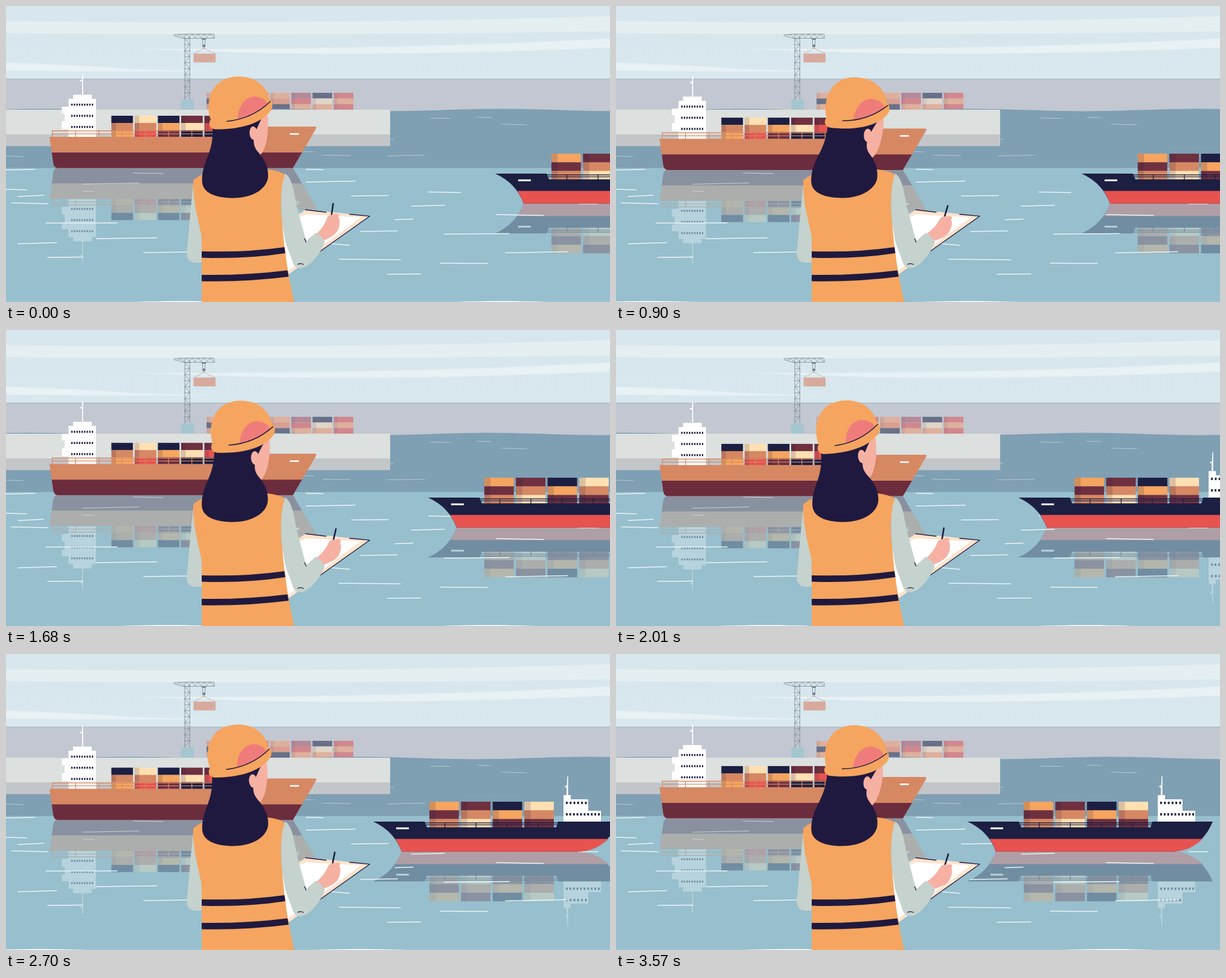
An HTML page with a canvas for the animation above (3600 ms loop, 1000 by 491 pixels).

```html
<!DOCTYPE html>
<html lang="en">
<head>
<meta charset="utf-8">
<title>Harbour</title>
<style>
  html, body { margin: 0; width: 100%; height: 100%; overflow: hidden; background: #fff; }
  canvas { display: block; width: 1000px; height: 491px; }
</style>
</head>
<body>
<canvas id="stage" width="1000" height="491"></canvas>
<script>
const ctx = document.getElementById('stage').getContext('2d');
const LOOP = 3600;
const C = {
  navy: '#1c1f42', hair: '#20193f', maroon: '#6f3040', keel: '#6b2c3d', red: '#e85350',
  rust: '#d68863', orange: '#f5a55f', cream: '#ffe0b3', white: '#ffffff',
  sea: '#97bfcd', deep: '#7f9fb3', skin: '#f6b1a3', sleeve: '#c6d2ce'
};

const rgb = hex => [1, 3, 5].map(i => parseInt(hex.slice(i, i + 2), 16));
const seaRgb = rgb(C.sea);
const solid = c => c;
const reflected = c => `rgb(${rgb(c).map((v, i) => Math.round(seaRgb[i] + (v - seaRgb[i]) * 0.31))})`;

const smooth = s => s * s * (3 - 2 * s);
// Eased value through [time, value] keys.
function track(keys, t) {
  for (let i = 1; i < keys.length; i++) {
    const [t0, a] = keys[i - 1], [t1, b] = keys[i];
    if (t <= t1) return a + (b - a) * smooth((t - t0) / (t1 - t0));
  }
  return keys[keys.length - 1][1];
}

const motion = {
  sail: [[0, 228], [3420, 0]],
  bob: [[0, 0], [1260, 4], [2400, 8], [3150, 3.9]],
  head: [[0, 0], [1140, 0.115], [2280, -0.06], [3420, 0.092]],
  hand: [[0, 0], [1140, 0.155], [2280, 0], [3420, 0.155]],
  swell: [[0, 0], [800, -235], [1150, -235], [1800, 0]]
};
const neck = { x: 378, y: 282 };

function rect(x0, y0, x1, y1, color) {
  ctx.fillStyle = color;
  ctx.fillRect(x0, y0, x1 - x0, y1 - y0);
}
function shape(d, color) {
  ctx.fillStyle = color;
  ctx.fill(new Path2D(d));
}
function stroke(d, color, width) {
  ctx.strokeStyle = color;
  ctx.lineWidth = width;
  ctx.stroke(new Path2D(d));
}
function turned(x, y, angle, draw) {
  ctx.save();
  ctx.translate(x, y);
  ctx.rotate(angle);
  ctx.translate(-x, -y);
  draw();
  ctx.restore();
}
function mirrored(y, draw) {
  ctx.save();
  ctx.translate(0, 2 * y);
  ctx.scale(1, -1);
  draw(reflected);
  ctx.restore();
}
// Turns the upper points of a path with the head while the lower ones only sway.
function bent(d, angle) {
  return d.replace(/([\d.]+) ([\d.]+)/g, (_, px, py) => {
    const x = px - neck.x, y = py - neck.y;
    const hold = Math.min(1, Math.max(0, (300 - py) / 80));
    const cos = Math.cos(angle * hold), sin = Math.sin(angle * hold);
    const sway = 17 * angle * (1 - hold);
    return `${neck.x + x * cos - y * sin - sway} ${neck.y + x * sin + y * cos}`;
  });
}

function windows(x, y, count, pitch, size, color) {
  for (let i = 0; i < count; i++) rect(x + i * pitch, y, x + i * pitch + size, y + size + 1, color);
}
function stacks(x, y, w, h, pitch, columns, tone) {
  columns.forEach((column, i) => column.split(' ').forEach((name, row) => {
    const left = x + i * pitch, top = y + row * h;
    rect(left, top, left + w, top + h + 0.2, tone(C[name]));
    ctx.save();
    ctx.globalAlpha = 0.16;
    rect(left, top, left + w * 0.21, top + h, tone(C.hair));
    ctx.restore();
  }));
}
function rail(x0, x1, top, middle, bottom, pitch, color) {
  rect(x0, top, x1, top + 1.4, color);
  rect(x0, middle, x1, middle + 1.2, color);
  for (let x = x0; x < x1; x += pitch) rect(x, top, x + 1.3, bottom, color);
}

function sky() {
  const g = ctx.createLinearGradient(0, 0, 0, 121);
  g.addColorStop(0, '#d8e6ed');
  g.addColorStop(1, '#d8e8ee');
  rect(0, 0, 1000, 122, g);
  shape('M0 25Q500 32 1000 17V42Q500 50 0 45Z', '#e5eff1');
  shape('M213 71Q640 73 1000 54V69Q620 85 360 76Q290 74 213 71Z', '#e8f1f4');
  shape('M0 94Q130 98 200 104Q270 107 345 108Q150 110 0 107Z', '#e8f1f4');
  rect(0, 121, 1000, 180, '#c2c7d1');
  rect(0, 120.5, 1000, 122, '#aebac6');
}

function crane() {
  const ink = '#78848e';
  rect(290, 155, 311, 172, '#a5c6cf');
  let d = 'M296 154V50M304.3 154V50M279 47.5L296 46.5H344L345.5 53.5H293L279 49.5Z';
  for (let y = 154, i = 0; y > 55; y -= 10, i++) {
    d += i % 2 ? `M304.3 ${y}L296 ${y - 10}H304.3` : `M296 ${y}L304.3 ${y - 10}H296`;
  }
  for (let x = 284; x < 342; x += 10) d += `M${x} 50L${x + 5} 47L${x + 10} 53`;
  d += 'M325.5 54V68M329.5 54V68M327.5 68V71';
  stroke(d, ink, 0.8);
  rect(324, 54, 331, 56, ink);
  rect(325.5, 64, 330, 68, ink);
  stroke('M311.5 79L327.5 70L346 79', '#c89f98', 0.8);
  rect(310.5, 79, 347, 93.5, '#d8aa9e');
}

function farContainers() {
  const tan = '#deb09d', slate = '#697189', rose = '#d2878e', mauve = '#b58a99', sand = '#dfd5c8';
  [[tan, slate, tan], [slate, tan, rose], [rose, sand, slate], [tan, '#d99f92', slate],
   [mauve, rose, tan], [slate, sand, tan], [rose, tan, rose]].forEach((column, i) => {
    column.forEach((color, row) => {
      const x = 332 + i * 35.1, y = 144 + row * 9.4;
      rect(x, y, x + 32.5, y + 9.5, color);
      rect(x, y, x + 6, y + 9.5, 'rgba(100,110,135,.15)');
    });
  });
}

function sea(peak) {
  const wave = (x, length) => Math.cos((x - peak) / length * 2 * Math.PI);
  ctx.fillStyle = C.deep;
  ctx.beginPath();
  ctx.moveTo(0, 270);
  for (let x = 0; x <= 1000; x += 10) ctx.lineTo(x, 172.5 - 1.9 * wave(x, 380));
  ctx.lineTo(1000, 270);
  ctx.fill();
  rect(0, 172, 636, 213, '#dce0de');
  rect(0, 213, 636, 232.5, '#c3c6c9');
  ctx.fillStyle = C.sea;
  ctx.beginPath();
  ctx.moveTo(1000, 268.7);
  ctx.lineTo(0, 268.7);
  for (let x = 0; x <= 1000; x += 10) ctx.lineTo(x, 493 - 3.5 * wave(x, 530));
  ctx.fill();
}

function ripples() {
  stroke('M0 249L28 250M490 241.5L510 242M525 247.5L570 248M632 248.5L693 247.5M703 186L736 186.5' +
    'M780 184.5L803 185M820 196L862 197M636 221H641', '#b3c8d3', 1.2);
  stroke('M127 307L145 307.5M127 295.5L220 293.5M211 277L260 278M465 331L485 328', '#c9d0d5', 1.2);
  stroke('M0 272L48 271M0 304L34 305M20 316L62 314M9 326.5L69 328M66 360L184 359.8M150 386L250 384.5' +
    'M69 417L127 416.5M20 394.5L84 392.5M228 409L310 408M497 271L525 271.5M497 292L578 290.5' +
    'M572 315L633 314.5M700 308.5L753 309.5M671 332L726 330.5M644 354.5L674 353.5M587 374L648 373' +
    'M551 420L653 421M725 378.5L833 377.5M719 426.5L797 427M631 445L687 444.5M525 393L569 397' +
    'M812 346L890 347.5M827 409.5L930 407.5M948 328H980', '#e9f3f5', 1.4);
}

function freighter(tone) {
  const white = tone(C.white), rust = tone(C.rust);
  shape('M126 113H127.7V147H142V154H149V218H103.5V204H92.5V191H97V178H92.5V167H103.5V154H111V147H126V125H122.5V123L126 122Z', white);
  for (const y of [162, 180.5, 199]) windows(108, y, 9, 4.25, 2.3, tone(C.navy));
  stacks(174.5, 182, 35.7, 12, 38.5, ['navy rust orange', 'cream rust red', 'navy orange maroon',
    'maroon cream navy', 'maroon red navy'], tone);
  shape('M72 217H360V200H512Q515 200 513 204L475 268.7H85Q80 268 78.5 262Z', rust);
  shape('M75.8 243H490L475 268.7H85Q80 268 78.5 262Z', tone(C.keel));
  rect(470, 211, 485, 213.5, white);
  rail(76, 360, 206.5, 211.5, 217, 38.5, rust);
}

function coaster(tone) {
  const white = tone(C.white), navy = tone(C.navy);
  shape('M903.2 203H904.6V234H909V241H938V260H959V279H897V234H902V221H899.5V219L902.7 218Z', white);
  windows(901, 245, 6, 6.3, 2.9, navy);
  windows(901, 264, 10, 5.9, 2.9, navy);
  stacks(675, 245, 48.8, 14.3, 52.4, ['orange maroon rust', 'maroon rust cream',
    'navy orange maroon', 'cream rust maroon'], tone);
  shape('M582 278H667L671 287.5H885L888 278H988C975 310 950 327.8 918 327.8H629Q617 294 582 278Z', navy);
  shape('M618.5 306.7H971.5C956 321 940 327.8 918 327.8H629Q625 316 618.5 306.7Z', tone(C.red));
  rect(620, 287.7, 641, 290.6, white);
  rail(648.5, 889, 279.5, 282.8, 289, 51.5, navy);
}

function ships(t) {
  const bob = track(motion.bob, t), sail = track(motion.sail, t);
  const at = (x, y, draw) => { ctx.save(); ctx.translate(x, y); draw(); ctx.restore(); };
  at(0, bob, () => mirrored(268.6, freighter));
  at(sail, 0, () => mirrored(327.6, coaster));
  ripples();
  at(0, bob, () => freighter(solid));
  at(sail, 0, () => coaster(solid));
}

function face() {
  shape('M415 188L430 178Q434 180 434 192C434 216 430 238 421 247Q408 240 409 215Z', C.skin);
}
function hair(angle) {
  shape(bent('M342 198C344 228 336 244 330 260C325 274 323 288 326 298C332 314 355 318.5 376 318.5' +
    'C410 318.5 434 302 434 281C434 265 426 252 418 243C410 234 409 226 411 215Q413 207 424 185Z', angle), C.hair);
}
function earAndHelmet() {
  ctx.fillStyle = C.skin;
  ctx.beginPath();
  ctx.ellipse(409.8, 211, 6.6, 11.2, -0.08, 0, 7);
  ctx.fill();
  shape('M337 183C330 148 346 117 386 117C414 117 432 135 436 154C442 158 443 167 438 174' +
    'C422 195 388 205 346 204.5C336 203 335 194 339 188Z', C.orange);
  shape('M383.5 187.5C384 166 396 150 412 150Q427 151 433 162Q414 181 383.5 187.5Z', '#ef7c7b');
  stroke('M366 191.3Q408 187 437.5 158.5', C.hair, 1.5);
}

function hand() {
  stroke('M541.6 328L538.8 347.5', C.navy, 2.6);
  shape('M512 380Q527 366 531 353Q533 346 541 346Q550 342 551.5 347Q549 350 552 353' +
    'C554 366 549 376 541 381Q532 387 525 389Z', C.skin);
}

function worker(t) {
  shape('M497 337.5L602 348.5L469 444.5L455 430V365Z', '#fde3cd');
  shape('M483 352L497 345.5L588 350.5L466 440L455 425V365Z', C.white);
  stroke('M496 338L530 342M569 345.5L602 348.7L520 407', C.hair, 1.3);
  shape('M311 288L322 330L325 425Q316 427 309 425Q298 422 299.5 407C303 370 306 330 311 288Z', C.sleeve);
  shape('M310 289Q327 275 350 271H432Q452 273 463 280C454 304 454 332 457 357C459 380 460 393 462 405' +
    'C465 433 472 468 477 491H324V382C317 350 309 322 310 289Z', C.orange);
  shape('M324 407Q398 409 461 400L462.5 410Q398 420 324 417.5Z', C.hair);
  shape('M324 446Q398 447 466 438.5L468 449Q398 458 324 456.5Z', C.hair);
  turned(520, 385, track(motion.hand, t), hand);
  shape('M462 278C474 284 477 310 482 335L497 390L513 376Q520 379 528 391C524 405 508 427 495 433' +
    'Q480 439 475 426C470 409 462 395 461 382C455 350 452 306 462 278Z', C.sleeve);
  stroke('M494.5 386L496.8 391.5M483 428.5Q488 426 492.5 428.7', C.hair, 1.3);
  const angle = track(motion.head, t);
  turned(neck.x, neck.y, angle, face);
  hair(angle);
  turned(neck.x, neck.y, angle, earAndHelmet);
}

function render(t) {
  rect(0, 0, 1000, 491, C.white);
  sky();
  crane();
  farContainers();
  sea(820 + track(motion.swell, t % 1800));
  ships(t);
  worker(t);
}

ctx.lineCap = 'round';
ctx.lineJoin = 'round';
const start = performance.now();
function tick(now) {
  render(Math.max(0, now - start) % LOOP);
  requestAnimationFrame(tick);
}
render(0);
requestAnimationFrame(tick);
</script>
</body>
</html>
```
